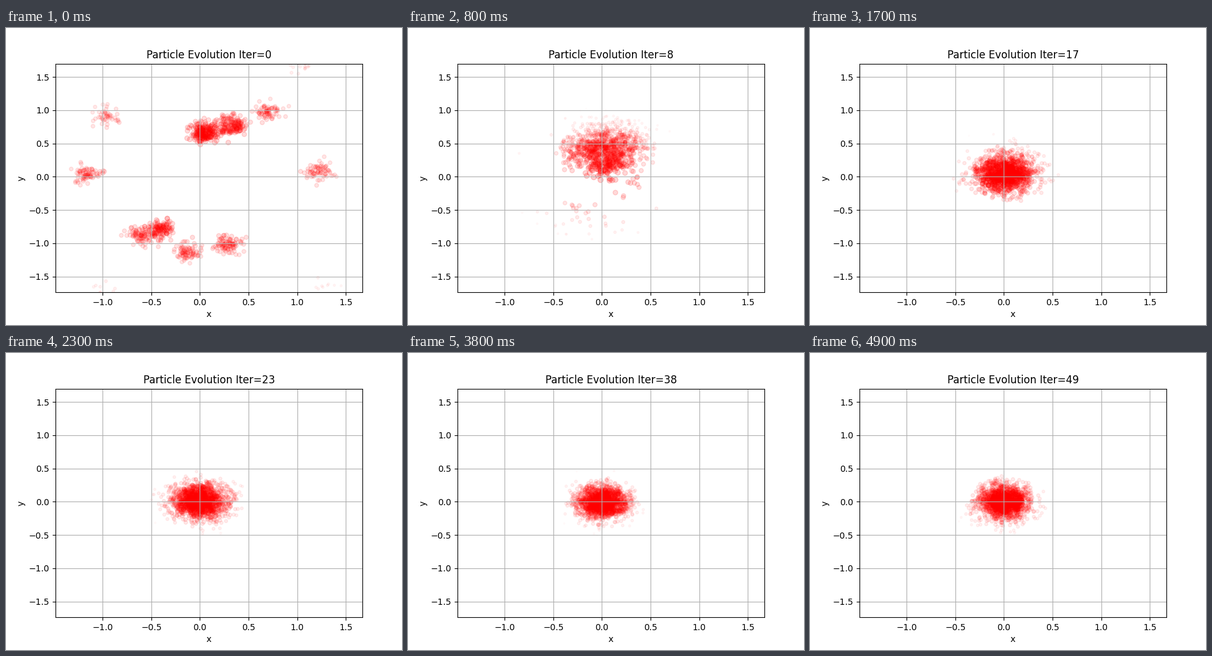
Write a matplotlib script that moves like this. It is 640 px wide and 480 px high and loops after 5 s.

```python
import numpy as np
import matplotlib.pyplot as plt
from matplotlib.animation import FuncAnimation

FRAMES, INTERVAL = 50, 100
COUNT = 1050
JITTER = 0.07

# Where the first survivors sit
SEEDS = np.array([
    (.05, .68), (.33, .77), (-.41, -.80), (-.61, -.87), (-.13, -1.12),
    (.29, -1.02), (1.22, .08), (-1.18, .03), (-.97, .92), (.69, .99),
    (1.04, 1.62), (1.29, -1.64), (-1.0, -1.70), (-1.85, 1.80),
])


def radius(points):
    return np.hypot(points[:, 0], points[:, 1])


def fitness(points):
    """1 at the origin, falling linearly to 0 at the farthest particle."""
    r = radius(points)
    return 1 - r / r.max()


def evolve():
    """Resample by fitness and jitter, once per iteration."""
    rng = np.random.default_rng(7)

    def resample(points, weight):
        chosen = rng.choice(len(points), COUNT, p=weight / weight.sum())
        return points[chosen] + rng.normal(0, JITTER, (COUNT, 2))

    history = [resample(SEEDS, np.exp(-2 * radius(SEEDS)))]
    while len(history) < FRAMES:
        points = history[-1]
        history.append(resample(points, fitness(points)))
    return history


def update(t):
    points = history[t]
    weight = fitness(points)
    colors = np.zeros((COUNT, 4))
    colors[:, 0] = 1
    colors[:, 3] = 0.2 * weight
    dots.set_offsets(points)
    dots.set_sizes(40 * weight)
    dots.set_facecolors(colors)
    title.set_text(f"Particle Evolution Iter={t}")
    return dots, title


history = evolve()
fig, ax = plt.subplots(figsize=(6.4, 4.8), dpi=100)
ax.set_xlim(-1.484, 1.669)
ax.set_ylim(-1.7368, 1.6994)
ax.set_xlabel("x")
ax.set_ylabel("y")
ax.grid(True)
title = ax.set_title("")
dots = ax.scatter([], [])

anim = FuncAnimation(fig, update, frames=FRAMES, interval=INTERVAL,
                     repeat=True, repeat_delay=0)
plt.show()
```
